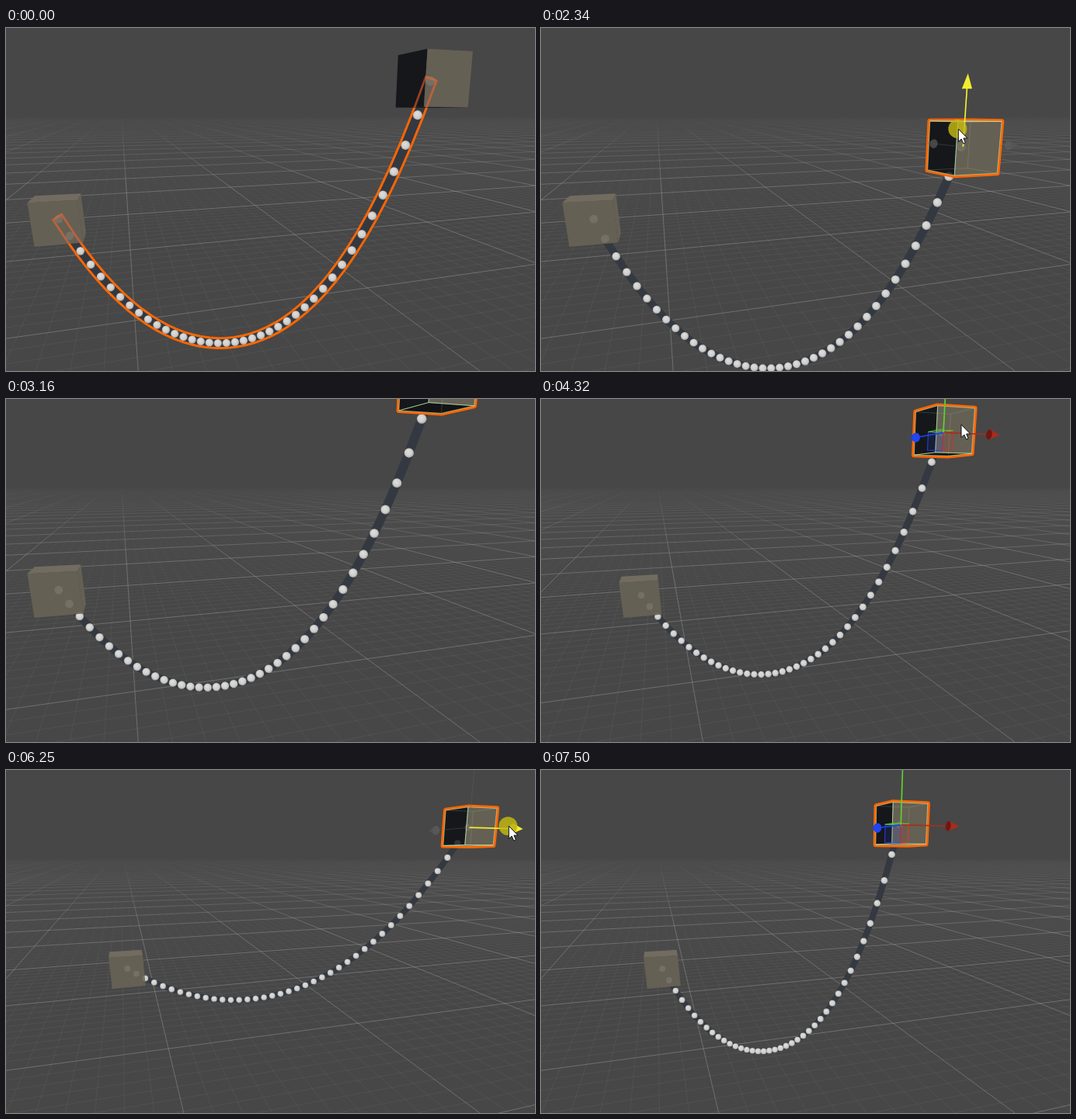
An HTML page with a canvas that plays this animation: 681 px wide and 442 px high, repeating every 8000 ms.

```html
<!DOCTYPE html>
<html lang="en">
<head>
<meta charset="utf-8">
<title>Hanging cable</title>
<style>
html, body { margin: 0; width: 681px; height: 442px; overflow: hidden; background: #474747; }
canvas { display: block; }
</style>
</head>
<body>
<canvas id="stage" width="681" height="442"></canvas>
<script>
const W = 681, HT = 442, LOOP = 8000;
const ctx = document.getElementById('stage').getContext('2d');

// Camera: optical centre, focal length, and the world axes in camera space.
const CX = 387, CY = 282, FOCAL = 610, HORIZON = 101, PITCH = 0.2685, EYE = 7.16;
const AX = [0.934, -0.096, 0.345];
const AZ = [-0.353, -0.251, 0.901];
const UP = [0, -0.9633, -PITCH];
const VP_X = 2130, VP_Z = 148;
const LEFT = [-5.6, -0.63, 10.7], RIGHT = [2.46, -3.25, 9.26];
const SPAN_X = 7.28, SPAN_Z = -3.48, RISE = 2.91, LENGTH = 12.7, DOTS = 40;
const ORANGE = '#ff6600', YELLOW = '#f4ee2e';
const GIZMO = 0.146;

// Tracks: [time, value...], eased between rows.
const LIFT = [[1800, 0], [2340, -1.267], [2410, -1.267], [2500, -1.33], [2580, -1.27], [3150, 1.285]];
const SLIDE = [[5900, 0], [6250, 2.46], [6310, 2.46], [6700, -1.75], [6880, -2.2], [7050, -2.1], [7400, -0.936]];
const DOLLY = [[4110, 0], [4390, 3], [4610, 3], [5060, 6.4], [5275, 6.4], [5350, 4.1]];
const POINTER = [[200, 690, 118], [640, 572, 60], [1020, 572, 60], [1590, 544, 43], [1780, 544, 43],
  [3220, 549, -47], [4040, 541, 33], [4610, 541, 33], [5060, 498, 90], [5275, 498, 90],
  [5350, 503, 97], [5420, 503, 97], [5690, 552, 72]];

let dolly = 0;

function track(keys, t) {
  if (t <= keys[0][0]) return keys[0].slice(1);
  for (let i = 1; i < keys.length; i++) {
    const a = keys[i - 1], b = keys[i];
    if (t < b[0]) {
      let k = (t - a[0]) / (b[0] - a[0]);
      k = k * k * (3 - 2 * k);
      return a.slice(1).map((v, j) => v + (b[j + 1] - v) * k);
    }
  }
  return keys[keys.length - 1].slice(1);
}

const add = (p, v, k) => p.map((c, i) => c + v[i] * k);
const dot = (a, b) => a[0] * b[0] + a[1] * b[1] + a[2] * b[2];
const depth = p => p[2] + dolly;
const project = p => [CX + FOCAL * p[0] / depth(p), CY + FOCAL * p[1] / depth(p)];

function trace(pts, close = true) {
  ctx.beginPath();
  pts.forEach(p => ctx.lineTo(p[0], p[1]));
  if (close) ctx.closePath();
}
function fill(pts, color) {
  trace(pts);
  ctx.fillStyle = color;
  ctx.fill();
}
function stroke(pts, color, width, close = false) {
  trace(pts, close);
  ctx.strokeStyle = color;
  ctx.lineWidth = width;
  ctx.stroke();
}
function disc(x, y, r, color) {
  ctx.beginPath();
  ctx.arc(x, y, r, 0, Math.PI * 2);
  ctx.fillStyle = color;
  ctx.fill();
}
function clipTo(pts, draw) {
  ctx.save();
  trace(pts);
  ctx.clip();
  draw();
  ctx.restore();
}

function fade(y0, y1, a) {
  const g = ctx.createLinearGradient(0, y0, 0, y1);
  g.addColorStop(0, 'rgba(165,165,165,0)');
  g.addColorStop(1, `rgba(165,165,165,${a})`);
  return g;
}
function gridLines(div, reachX, reachZ, color) {
  const h = 1 + PITCH * dolly / EYE;
  const row = 0.001656 / h, du = row / div, dm = 1.29 / h / div;
  const u0 = 0.00448 - 0.687 * row, m0 = 1.355;
  ctx.beginPath();
  for (let k = Math.ceil((0.0015 - u0) / du); u0 + k * du < reachX; k++) {
    if (div > 1 && k % div === 0) continue;
    const s = 1 / (u0 + k * du);
    ctx.moveTo(0, HORIZON + s);
    ctx.lineTo(W, HORIZON + s * (1 - W / VP_X));
  }
  for (let k = Math.ceil((-reachZ - m0) / dm); m0 + k * dm < reachZ; k++) {
    if (div > 1 && k % div === 0) continue;
    const m = m0 + k * dm;
    ctx.moveTo(VP_Z + m * 12, HORIZON + 12);
    ctx.lineTo(VP_Z + m * (HT - HORIZON), HT);
  }
  ctx.strokeStyle = color;
  ctx.lineWidth = 1;
  ctx.stroke();
}
function drawGrid() {
  gridLines(10, 0.03, 12, fade(125, 270, 0.09));
  gridLines(1, 0.08, 36, fade(114, 205, 0.42));
}

// Catenary of fixed length, sampled evenly along the ground.
function cable(lift, slide) {
  const sx = SPAN_X + slide, w = Math.hypot(sx, SPAN_Z), v = RISE + lift;
  const flat = Math.sqrt(LENGTH * LENGTH - v * v);
  let lo = 0.01, hi = 5;
  for (let i = 0; i < 40; i++) {
    const k = (lo + hi) / 2;
    if (Math.sinh(k) / k < flat / w) lo = k; else hi = k;
  }
  const a = w / (2 * lo), start = Math.asinh(v / flat) - lo;
  return Array.from({ length: DOTS }, (_, i) => {
    const t = i / (DOTS - 1);
    const h = a * (Math.cosh(start + 2 * lo * t) - Math.cosh(start));
    const p = add(add(add(LEFT, AX, t * sx), AZ, t * SPAN_Z), UP, h);
    const [x, y] = project(p);
    return { x, y, z: depth(p) };
  });
}
function ribbon(pts, extra) {
  const one = [], two = [], n = pts.length - 1;
  pts.forEach((p, i) => {
    const a = pts[Math.max(0, i - 1)], b = pts[Math.min(n, i + 1)];
    const l = Math.hypot(b.x - a.x, b.y - a.y), dx = (b.x - a.x) / l, dy = (b.y - a.y) / l;
    const r = 0.09 * FOCAL / p.z + extra;
    const e = i === 0 ? -3 : i === n ? 3 : 0;
    one.push([p.x + dx * e + dy * r, p.y + dy * e - dx * r]);
    two.unshift([p.x + dx * e - dy * r, p.y + dy * e + dx * r]);
  });
  return one.concat(two);
}
function drawDots(pts) {
  for (const { x, y, z } of pts) {
    const r = 58 / z;
    const g = ctx.createRadialGradient(x - r * 0.2, y - r * 0.3, r * 0.2, x, y, r);
    g.addColorStop(0, '#dcdcda');
    g.addColorStop(0.65, '#cececc');
    g.addColorStop(1, '#a2a2a1');
    disc(x, y, r, g);
  }
}

const FACES = [
  [AZ, AX, UP, 1, '#555043'], [AX, AZ, UP, 1, '#656054'], [UP, AX, AZ, 1, '#716b60'],
  [UP, AX, AZ, -1, '#111316'], [AX, AZ, UP, -1, '#15171b'], [AZ, AX, UP, -1, '#656054']
];
function cubeFaces(c, size) {
  return FACES.map(([n, a, b, s, color]) => {
    const mid = add(c, n, s * size / 2);
    const pts = [[1, 1], [1, -1], [-1, -1], [-1, 1]]
      .map(([i, j]) => project(add(add(mid, a, i * size / 2), b, j * size / 2)));
    return { pts, color, seen: dot([mid[0], mid[1], depth(mid)], n) * s < 0 };
  });
}
function hull(pts) {
  pts = pts.slice().sort((a, b) => a[0] - b[0] || a[1] - b[1]);
  const half = list => {
    const out = [];
    for (const p of list) {
      while (out.length > 1) {
        const a = out[out.length - 2], b = out[out.length - 1];
        if ((b[0] - a[0]) * (p[1] - a[1]) - (b[1] - a[1]) * (p[0] - a[0]) > 0.01) break;
        out.pop();
      }
      out.push(p);
    }
    out.pop();
    return out;
  };
  return half(pts).concat(half(pts.reverse()));
}
function drawCube(c, size, chosen, dots, ropeChosen) {
  const faces = cubeFaces(c, size);
  const shape = hull(faces[0].pts.concat(faces[5].pts));
  if (chosen) stroke(shape, ORANGE, 6.4, true);
  faces.forEach(f => f.seen && fill(f.pts, f.color));
  clipTo(shape, () => {
    dots.forEach(p => disc(p.x, p.y, 58 / p.z, 'rgba(190,190,185,.17)'));
    if (ropeChosen) stroke(ribbon(dots, 1.4), 'rgba(255,100,40,.55)', 2.8, true);
  });
  if (chosen) faces.forEach(f =>
    stroke(f.pts, f.seen ? 'rgba(190,232,178,.55)' : 'rgba(150,190,145,.12)', 1, true));
}

function drawAxis(c, dir, color, dark, ghost) {
  const size = GIZMO * depth(c), base = add(c, dir, size * 0.8);
  const others = [AX, AZ, UP].filter(v => v !== dir);
  const ring = Array.from({ length: 18 }, (_, i) => {
    const a = i / 18 * Math.PI * 2, r = size * 0.07;
    return project(add(add(base, others[0], Math.cos(a) * r), others[1], Math.sin(a) * r));
  });
  const tip = project(add(c, dir, size));
  ctx.globalAlpha = ghost ? 0.4 : 1;
  stroke([project(c), project(base)], color, ghost ? 1 : 1.7);
  fill(hull(ring.concat([tip])), color);
  if (dir[2] > 0) fill(ring, dark);
  ctx.globalAlpha = 1;
}
function drawPlane(c, a, b, rgb) {
  const s = GIZMO * 0.25 * depth(c);
  const pts = [c, add(c, a, s), add(add(c, a, s), b, s), add(c, b, s)].map(project);
  fill(pts, `rgba(${rgb},.14)`);
  stroke(pts, `rgba(${rgb},.85)`, 1.1, true);
}
function drawGizmo(c, active, dragging) {
  const axes = [[AZ, '#1d3fe6', '#2145f0'], [AX, '#a92c1c', '#741510'], [UP, '#5fd02c', '#47a020']];
  if (!dragging) {
    const back = v => v.map(n => -n);
    const vert = project(c)[1] > HORIZON ? UP : back(UP);
    drawPlane(c, back(AX), vert, '40,70,235');
    drawPlane(c, back(AZ), vert, '205,50,35');
    drawPlane(c, back(AX), back(AZ), '95,205,50');
  }
  for (const [dir, color, dark] of axes) {
    if (dir === active) drawAxis(c, dir, YELLOW, '#b8b022');
    else if (dragging) drawAxis(c, dir, '#62625f', '#62625f', true);
    else drawAxis(c, dir, color, dark);
  }
}

const ARROW = [[0, 0], [0, 16.5], [3.8, 13], [6.4, 19], [9, 17.8], [6.6, 12], [11.6, 12]];
function drawPointer([x, y], pressed) {
  if (pressed) disc(x - 1, y, 12, 'rgba(196,186,20,.82)');
  const pts = ARROW.map(p => [x + p[0], y + p[1]]);
  fill(pts, '#fff');
  stroke(pts, '#111', 1, true);
}

function draw(t) {
  dolly = track(DOLLY, t)[0];
  const lift = track(LIFT, t)[0], slide = track(SLIDE, t)[0];
  const box = add(add(RIGHT, UP, lift), AX, slide);
  const [bx, by] = project(box);
  const dots = cable(lift, slide);
  const ropeChosen = t < 740;
  const dragUp = t >= 1780 && t < 3220, dragX = t >= 5900 && t < 7430;
  const hoverX = (t > 1060 && t < 1250) || (t > 5560 && t < 5900);

  ctx.lineJoin = 'round';
  ctx.fillStyle = '#474747';
  ctx.fillRect(0, 0, W, HT);
  drawGrid();

  if (ropeChosen) stroke(ribbon(dots, 1.4), ORANGE, 3.2, true);
  fill(ribbon(dots, 0), '#343941');
  drawDots(dots);
  drawCube(LEFT, 0.96, false, dots, ropeChosen);
  drawCube(box, 1, !ropeChosen, dots, ropeChosen);
  if (!ropeChosen) {
    drawGizmo(box, dragUp ? UP : dragX || hoverX ? AX : null, dragUp || dragX);
  }

  if (t >= 200 && t < 7430) {
    const at = dragUp ? [bx - 6, by - 23] : dragX ? [bx + 51, by - 2] : track(POINTER, t);
    drawPointer(at, dragUp || dragX || (t > 670 && t < 800));
  }
}

const begin = performance.now();
function tick() {
  draw((performance.now() - begin) % LOOP);
  requestAnimationFrame(tick);
}
tick();
</script>
</body>
</html>
```
